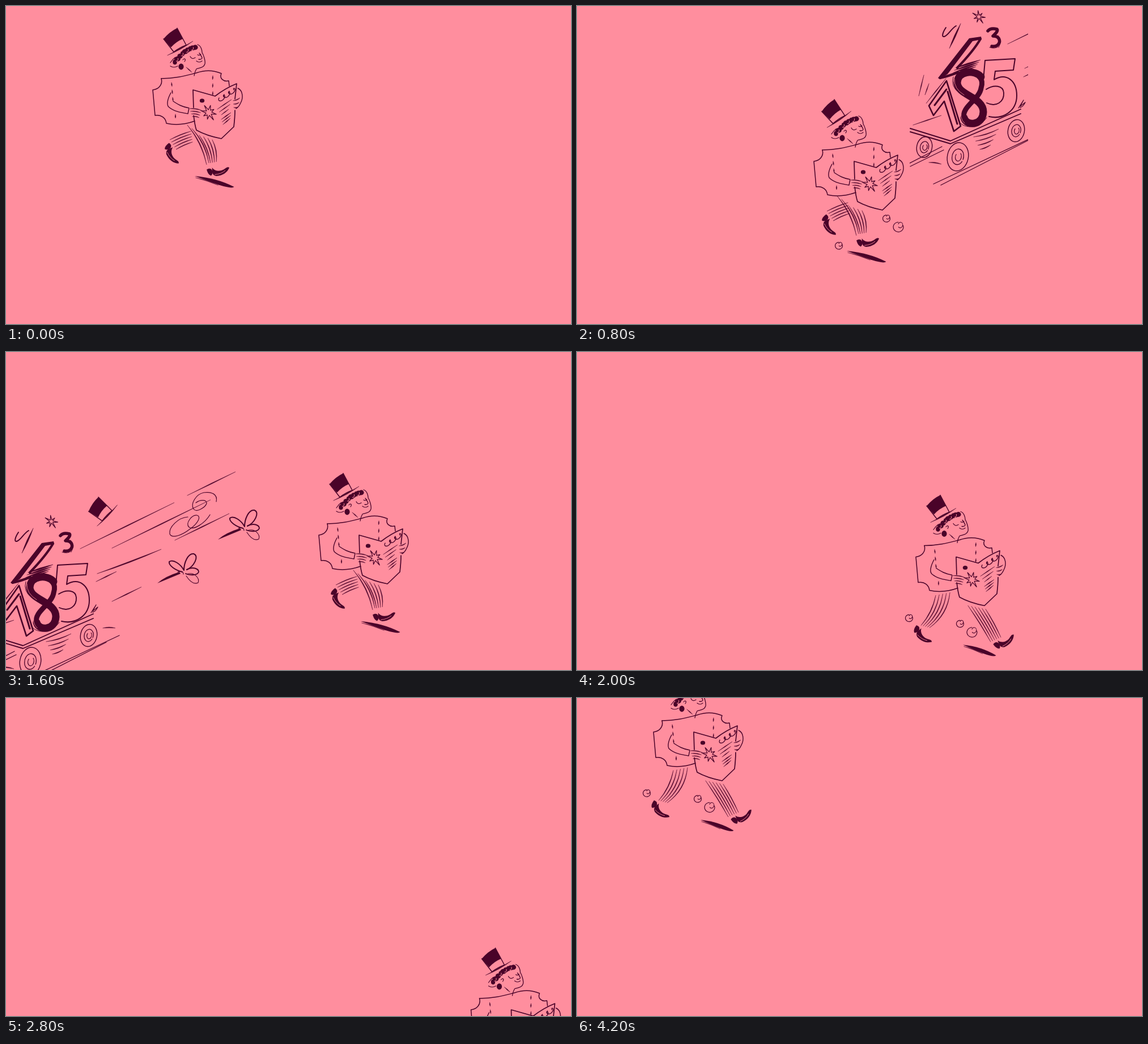
Write an HTML page with a canvas that moves like this. It is 997 by 561 pixels and loops after 4700 ms.

```html
<!DOCTYPE html>
<html lang="en">
<head>
<meta charset="utf-8">
<title>Walking ticket</title>
<style>
html, body { margin: 0; width: 100%; height: 100%; overflow: hidden; background: #ff8e9e; }
canvas { display: block; width: 997px; height: 561px; }
</style>
</head>
<body>
<canvas id="stage" width="997" height="561"></canvas>
<script>
const PAPER = '#ff8e9e', INK = '#4a0329', LOOP = 4700, TAU = Math.PI * 2;
const SLOPE = -0.49; // every track, plank and speed line climbs alike
const ctx = document.getElementById('stage').getContext('2d');

function line(d, w = 1.5, color = INK) {
  ctx.strokeStyle = color;
  ctx.lineWidth = w;
  ctx.stroke(new Path2D(d));
}

function fill(d, color = INK) {
  ctx.fillStyle = color;
  ctx.fill(new Path2D(d));
}

// Pen stroke, thin at both ends; the bend pushes the middle sideways.
function pen(w, x0, y0, x1, y1, bend = 0) {
  const len = Math.hypot(x1 - x0, y1 - y0);
  const nx = (y0 - y1) / len, ny = (x1 - x0) / len;
  const mx = (x0 + x1) / 2, my = (y0 + y1) / 2;
  const a = bend * 2 + w, b = bend * 2 - w;
  ctx.beginPath();
  ctx.moveTo(x0, y0);
  ctx.quadraticCurveTo(mx + nx * a, my + ny * a, x1, y1);
  ctx.quadraticCurveTo(mx + nx * b, my + ny * b, x0, y0);
  ctx.fillStyle = ctx.strokeStyle = INK;
  ctx.lineWidth = 0.4;
  ctx.fill();
  ctx.stroke();
}

// A row of pen strokes blended from the first to the last.
function fan(n, w, first, last) {
  for (let i = 0; i < n; i++) {
    pen(w, ...first.map((v, k) => v + (last[k] - v) * i / (n - 1)));
  }
}

function streak(x, y, len, w = 1.5) {
  pen(w, x, y, x + len, y + len * SLOPE);
}

function ring(x, y, rx, ry, w, from = 0, to = TAU) {
  ctx.beginPath();
  ctx.ellipse(x, y, rx, ry, 0.2, from, to);
  ctx.strokeStyle = INK;
  ctx.lineWidth = w;
  ctx.stroke();
}

function disc(x, y, rx, ry = rx) {
  ctx.beginPath();
  ctx.ellipse(x, y, rx, ry, 0, 0, TAU);
  ctx.fillStyle = INK;
  ctx.fill();
}

function star(x, y, rays, outer, inner, turn) {
  ctx.beginPath();
  for (let i = 0; i < rays * 2; i++) {
    const a = turn + i * Math.PI / rays;
    const r = i % 2 ? inner : outer + 2.5 * Math.sin(i * 2.3);
    ctx.lineTo(x + r * Math.cos(a), y + r * Math.sin(a));
  }
  ctx.closePath();
  ctx.strokeStyle = INK;
  ctx.lineWidth = 1.2;
  ctx.stroke();
}

function at(x, y, draw, turn = 0) {
  ctx.save();
  ctx.translate(x, y);
  ctx.rotate(turn);
  draw();
  ctx.restore();
}

// Origin at the top corner of the crown.
function hat() {
  fill('M-24 19 Q-13 6 0 0 L10 19 Q-2 24 -11 34 Z');
  line('M-24 19 L-6 42 Q5 34 16 30 L0 0');
  pen(1.6, -17, 48, 28, 23, 1);
}

// Curls run along an arc from the forehead to the nape.
function hair() {
  const curls = 9;
  for (let i = 0; i < curls; i++) {
    const u = i / (curls - 1);
    const x = 334 - 36 * u, y = 73 + 4 * u + 22 * u * u;
    disc(x, y, 4.6 + Math.sin(i * 2.1), 4.4);
    if (i % 2) ring(x + 1, y + 2, 2.4, 3, 1, 3.4, 5.6);
  }
  for (let i = 1; i < curls; i += 2) {
    const u = i / (curls - 1);
    const x = 334 - 36 * u, y = 74 + 4 * u + 22 * u * u;
    line(`M${x - 2} ${y + 3} q4 0 3 -5`, 1, PAPER);
  }
  line('M290 106 Q296 110 303 106 M290 100 Q294 94 298 91', 1.2);
  disc(309, 107, 4.6, 5.4);
}

function head() {
  hair();
  line('M312 95 C315 91 318 94 315 98', 1.2);
  line('M338 68 C344 70 346 78 346 82 C349 87 352 97 351 102 C349 109 342 109 336 111 Q333 116 332 123', 1.3);
  line('M341 83 Q346 90 346 92 Q344 95 340 94', 1.3);
  line('M325 89 Q328 95 334 91 M338 86 Q342 88 344 85 M336 97 Q341 101 346 97', 1.2);
  pen(1.4, 318, 108, 328, 117);
}

function ticket() {
  line('M274 128 C302 128 320 122 336 118 C350 113 366 113 380 119 C376 128 384 134 393 132 L394 141');
  line('M274 128 C277 139 269 147 259 148 L263 193 C274 191 282 198 283 207 C301 211 316 209 333 203');
  for (let i = 0; i < 3; i++) {
    pen(1.7, 292 + i, 135 + i * 13, 293 + i, 142 + i * 13);
    pen(1.7, 365, 123 + i * 14, 364.5, 130 + i * 14);
  }
  pen(1.7, 299, 191, 299, 198);
  line('M291 153 C285 164 283 174 287 178 C296 186 309 188 321 190 L323 180 C311 178 304 174 295 168', 1.4);
}

function sheet() {
  fill('M330 148 L369 159 L407 137 L403 213 L380 234 L336 219 Z', PAPER);
  line('M404 164 L407 137 Q387 145 369 159 L330 148 L331 181', 1.7);
  line('M404 184 Q404 196 402 213 L380 234 Q354 229 336 219 Q333 210 331 192', 1.7);
  disc(346, 167, 4.2, 3.6);
  star(358, 188, 8, 13, 5, -1.35);
  for (let i = 0; i < 3; i++) {
    at(376 + i * 9, 162 - i * 6, () => line('M0 0 C-4 7 6 8 10 -1 C11 -6 6 -6 8 -2', 1.4));
  }
  fan(3, 1.2, [373, 182, 398, 165], [380, 192, 393, 182]);
  fan(3, 1.5, [380, 200, 397, 188], [383, 209, 396, 198]);
}

function hands() {
  fill('M323 180 Q333 178 341 185 L340 195 L328 192 Z', PAPER);
  fan(4, 1.2, [324, 181, 345, 184, -1], [329, 195, 341, 197, -1]);
  line('M409 145 C418 149 419 162 414 171 Q411 178 406 181', 1.4);
  fan(3, 1.2, [401, 167, 413, 162, 1], [402, 179, 410, 178, 1]);
}

// Heel at the origin, toe to the right.
function shoe(x, y, turn) {
  at(x, y, () => {
    fill('M-3 -6 Q3 -9 6 -4 Q8 3 3 6 Q-2 4 -3 -6 Z');
    fill('M7 -8 C11 0 20 1 26 -1 C31 -3 34 -6 37 -3 C32 5 23 9 12 8 Q6 6 6 0 Z');
    line('M10 5 Q21 6 29 1', 0.8, PAPER);
  }, turn);
}

function shadow(x, y, len) {
  at(x, y, () => {
    fill(`M0 0 Q${len * 0.55} 2 ${len} 17 Q${len * 0.95} 21 ${len * 0.6} 14 Z`);
    pen(0.8, 2, 3, len * 0.6, 15, -1);
  }, 0.03);
}

function bubble(x, y, r) {
  ring(x, y, r, r * 0.95, 1.2, -0.5, 4.5);
  ring(x + r * 0.4, y - r * 0.4, r * 0.45, r * 0.55, 1.1, -2.9, 2.2);
}

function bubbles(x, y, dx, dy) {
  bubble(x, y, 6.5);
  bubble(x + dx, y + dy, 6.5);
  bubble(x + dx + 21, y + dy + 15, 9);
}

function backLegBent() {
  fan(5, 1.1, [326, 221, 289, 236, 1], [329, 240, 300, 253, 1]);
  shoe(284, 247, 1.06);
}

function frontLegBent() {
  fan(2, 1.4, [320, 210, 354, 280, -5], [328, 216, 358, 277, -5]);
  fan(4, 1.2, [341, 228, 361, 277, -3], [364, 236, 371, 275, -3]);
  shoe(358, 294, -0.16);
}

function legsWide() {
  fan(5, 1.2, [294, 216, 268, 269, -4], [319, 211, 283, 273, -8]);
  shoe(258, 275, 0.75);
  fan(6, 1.1, [351, 234, 391, 298, -1], [382, 240, 409, 290, -1]);
  shoe(401, 306, -0.51);
  shadow(342, 303, 59);
  bubbles(247, 256, 90, 10);
}

function wheel(x, y, r) {
  ring(x, y, r, r * 1.36, 1.4);
  ring(x, y, r * 0.55, r * 0.75, 1.3, 0.5, 6.5);
  ring(x + 1, y, r * 0.28, r * 0.42, 1.2, -1, 3.6);
}

function smallDigits() {
  star(709, 19, 7, 11, 3, -1.7);
  line('M651 38 C645 47 643 55 648 54 C656 51 660 40 669 35', 2);
  pen(2.8, 677, 31, 657, 75);
  line('M725 44 Q730 38 741 41 Q744 44 734 53 C747 53 748 64 742 69 Q737 72 732 71', 5.5);
  line('M743 52 Q751 61 744 73 M728 73 Q737 76 743 72', 1);
}

function four() {
  fill('M692 57 L713 54 L714 59 L698 62 L654 120 L640 129 L637 127 Z');
  line('M712 58 Q700 79 671 109 M641 127 Q658 123 672 117', 4.2);
  fan(4, 2.8, [668, 109, 712, 95], [662, 122, 704, 107]);
}

function one() {
  line('M652 132 L621 176 L629 193 L648 168 L665 221 L677 212 Z', 2.6);
  line('M652 147 L631 175 M654 151 L671 208', 3);
  pen(1.4, 651, 128, 616, 172);
}

function eight() {
  line('M713 125 C702 112 672 114 671 135 C671 158 717 160 717 187 C716 211 687 213 683 197', 13);
  line('M683 197 C678 178 710 165 713 145 Q717 133 711 126', 9);
  line('M673 202 C679 216 708 219 723 197 M664 125 Q659 142 674 153', 1);
  line('M679 181 Q674 198 684 207 M666 129 Q665 146 683 157', 0.8, PAPER);
}

function five() {
  line('M716 143 L720 96 L773 93 L770 113 L738 115 L736 130 C758 117 776 132 776 158 C776 185 752 201 727 195', 2);
  line('M723 171 C740 179 754 169 753 153 C752 140 736 138 722 147', 1.9);
}

function cart() {
  smallDigits();
  [four, one, eight, five].forEach(draw => draw());
  for (let i = 0; i < 2; i++) {
    line(`M588 ${216 + i * 6} L659 ${238 + i * 5} l124 ${-56 + i * 3}`, 1.9);
    line(`M${629 + i * 13} ${314 + i * 2} l${200 - i * 36} ${-94 + i * 10}`, 1.3);
    line(`M${576 + i * 12} 283 l${68 - i * 9} ${-35 + i * 6}`, 1.3);
  }
  pen(1.3, 593, 210, 643, 193);
  wheel(613, 249, 13.5);
  wheel(672, 266, 18.5);
  wheel(775, 220, 14.5);
  fan(4, 1.3, [700, 231, 744, 217, 2], [711, 253, 730, 245, 1]);
  fan(2, 1.2, [612, 122, 603, 159], [621, 137, 614, 157]);
  pen(1.6, 621, 276, 643, 279, -1);
  pen(1.6, 800, 207, 822, 207, -1);
  line('M779 180 L788 166 L782 177 L791 170 Q787 178 782 179', 1.3);
}

function flower() {
  fill('M675 207 Q688 195 714 187 L716 190 Z');
  line('M719 187 C707 184 695 176 696 169 C703 164 716 173 722 184 C722 171 729 154 739 155 C750 159 739 178 727 183', 2);
  line('M727 183 C737 177 748 181 748 187 C745 194 732 193 725 190', 1.9);
  line('M727 191 C740 186 750 198 747 206 Q737 211 726 194 M711 187 Q721 184 721 191', 1.1);
}

function speedLines() {
  streak(432, 223, 166);
  streak(488, 222, 174);
  streak(621, 129, 85);
  streak(599, 208, 96);
  streak(460, 281, 36);
}

function gust() {
  speedLines();
  line('M672 140 C675 127 664 122 650 124 C636 127 626 144 632 153 C637 160 653 150 655 143 C656 137 645 135 636 142', 1.2);
  line('M622 167 C605 168 588 185 590 197 C594 206 612 199 626 188 C640 178 646 166 638 164 C629 163 617 178 624 185 C632 191 652 178 661 163', 1.2);
  at(464, 132, hat, -0.3);
  flower();
}

// The cart scene enters cropped, then passes behind the walker.
function enter() {
  ctx.save();
  ctx.beginPath();
  ctx.rect(587, 0, 209, 561);
  ctx.clip();
  cart();
  at(328, -156, () => {
    speedLines();
    streak(462, 266, 50);
  });
  ctx.restore();
}

function pass() {
  at(-328, 156, cart);
  gust();
  streak(462, 266, 50);
  streak(624, 261, 48);
  pen(1.6, 642, 266, 678, 268, -1);
}

function leave() {
  at(-629, 280, cart);
  at(-301, 124, () => {
    gust();
    at(-107, 77, flower);
    pen(2, 462, 267, 575, 224, 1);
    streak(488, 316, 52);
  });
}

function stride(wide, lag) {
  if (wide) return legsWide();
  at(-7 * lag, 0, backLegBent);
  at(-20 * lag, -lag, frontLegBent);
  at(-16 * lag, 6 * lag, () => shadow(333, 300, 70));
  if (lag) bubbles(303, 297, 84, -48);
}

function walker([x, y], i) {
  const lag = i === 2 ? 1 : 0, hatless = i === 3;
  at(x, y, () => {
    stride(i % 2 || i === 10, lag);
    [ticket, sheet, hands, head].forEach(draw => draw());
    if (!hatless) at(302 - 7 * lag, 39, hat, -0.09 * lag);
  });
}

const SCENES = { 2: enter, 3: pass, 4: leave };
const PLACES = [
  [0, 0], [62, 40], [159, 126], [244, 145], [293, 175], [339, 213.5],
  [446, 296], [561.5, 402], null, [-305, -216], [-124, -88]
];

// Eight short beats, then three long ones after the walker has left.
function beatAt(t) {
  return t < 3200 ? Math.floor(t / 400) : t < 3700 ? 8 : t < 4200 ? 9 : 10;
}

// The last two beats swap feet because the empty beat takes a step.
function isWide(i) {
  return i < 8 ? i % 2 === 1 : i === 10;
}

function stage(i) {
  ctx.fillStyle = PAPER;
  ctx.fillRect(0, 0, 997, 561);
  if (SCENES[i]) SCENES[i]();
  const place = PLACES[i];
  if (!place) return;
  const lag = i === 2 ? 1 : 0, hatless = i === 3;
  at(...place, () => {
    stride(isWide(i), lag);
    [ticket, sheet, hands, head].forEach(draw => draw());
    if (!hatless) at(302 - 7 * lag, 39, hat, -0.09 * lag);
  });
}

let shown = -1;

function tick() {
  const beat = beatAt(performance.now() % LOOP);
  if (beat !== shown) stage(shown = beat);
  requestAnimationFrame(tick);
}

ctx.lineCap = ctx.lineJoin = 'round';
tick();
</script>
</body>
</html>
```
